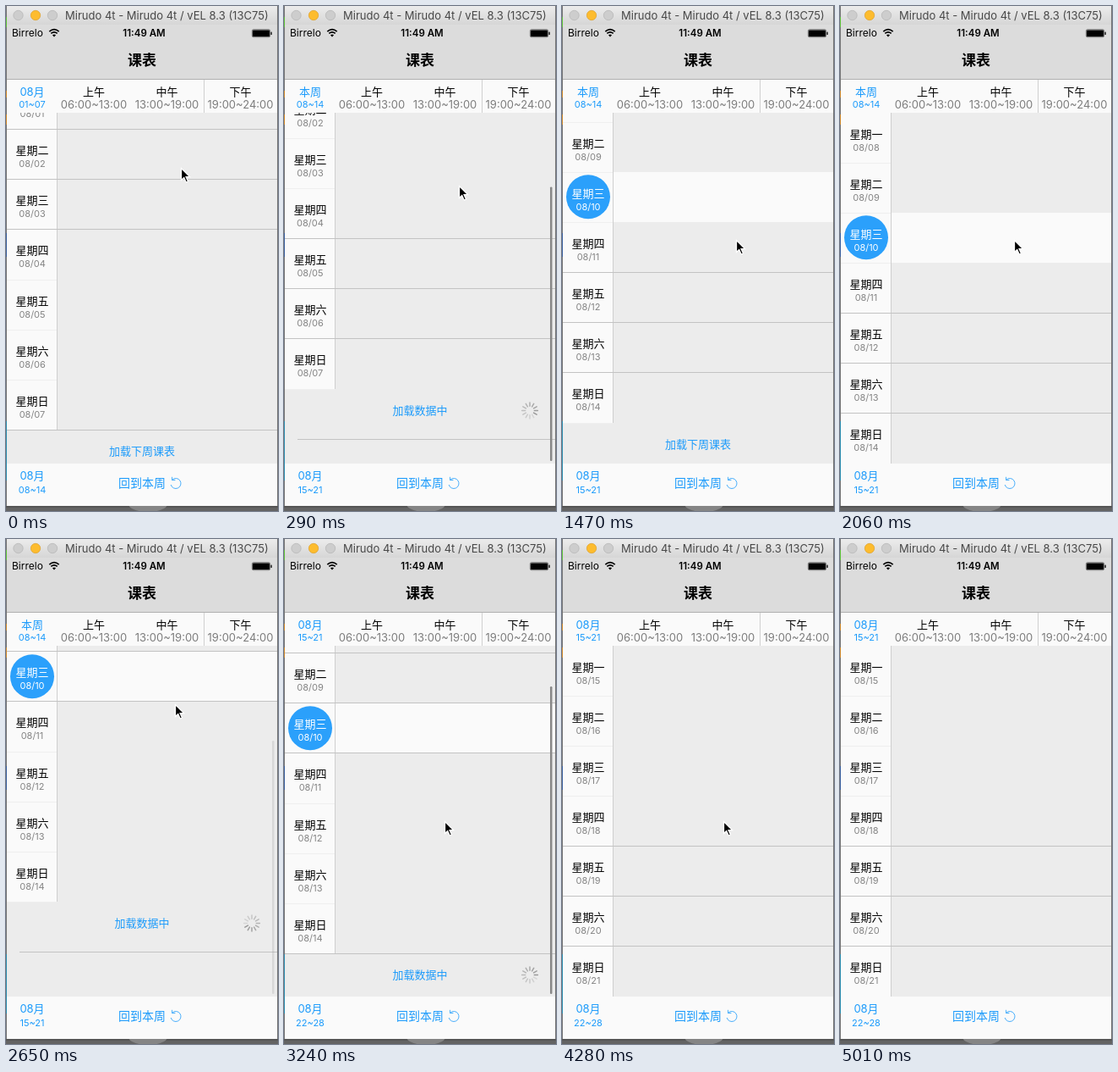
An HTML page that plays this animation: 322 px wide and 596 px high, repeating every 5.16 s.

```html
<!DOCTYPE html>
<html lang="zh-CN">
<head>
<meta charset="utf-8">
<style>
html, body { margin: 0; width: 100%; height: 100%; overflow: hidden; background: #666; }
svg { display: block; width: 322px; height: 596px; font-family: Inter, "Noto Sans CJK SC", "Noto Sans CJK", sans-serif; }
</style>
</head>
<body>
<svg id="stage" viewBox="0 0 322 596"></svg>
<script>
const LOOP = 5160, STEPS = 35, CYCLE = 17;
const TOP = 126, BOTTOM = 540, ROW = (BOTTOM - TOP) / 7, TODAY = 10;
const BLUE = '#1c9bfb', PAPER = '#fafafa', GREY = '#ececec', LINE = '#c3c3c3';
const DAYS = [...'一二三四五六日'];

// Per step of one pull-to-load cycle: scroll offset while pulled, scrollbar opacity.
const REST = 50.5, PULL = [39.5, 111.55, 88, 62, 52.5];
const BAR = [0, .2, 1, 1, 1, 1, 1, .6, .2];
// Times when new data arrives and the list starts to glide back to its top.
const RELOAD = [1418.9, 3919.2], GLIDE = 350;
// Pointer path: step, x, y.
const POINTER = [[0, 207, 191], [1, 207, 193], [2, 207, 212], [4, 206, 266], [5, 206, 276],
  [15, 206, 276], [16, 203, 254], [17, 201, 203], [18, 200, 195], [19, 199, 215], [21, 192, 322],
  [22, 190, 333], [29, 191, 333], [30, 205, 370], [31, 240, 450], [32, 275, 524], [33, 304, 576]];

const rect = (x, y, w, h, fill, more = '') =>
  `<rect x="${x}" y="${y}" width="${w}" height="${h}" fill="${fill}" ${more}/>`;
const circle = (x, y, r, fill, more = '') =>
  `<circle cx="${x}" cy="${y}" r="${r}" fill="${fill}" ${more}/>`;
const text = (s, x, y, size, fill = '#000', more = 'text-anchor="middle"') =>
  `<text x="${x}" y="${y + size * .37}" font-size="${size}" fill="${fill}" ${more}>${s}</text>`;
const pad = n => String(n).padStart(2, '0');
const ease = p => p < .5 ? 2 * p * p : 1 - 2 * (1 - p) ** 2;

function scrollOffset(step, pos, cycle) {
  if (pos < PULL.length) return PULL[pos];
  const p = (step * LOOP / STEPS - RELOAD[cycle]) / GLIDE;
  return REST * (1 - ease(Math.min(1, Math.max(0, p))));
}

function weekLabel(week, y, gap) {
  const first = week * 7 + 1;
  return text(week === 1 && y < TOP ? '本周' : '08月', 31, y, 13, BLUE) +
    text(`${pad(first)}~${pad(first + 6)}`, 31, y + gap, 11, BLUE);
}

function spinner(x, y, step) {
  const head = Math.round(step * LOOP / STEPS / 1000 * 12);
  let out = '';
  for (let k = 0; k < 12; k++) {
    const alpha = 1 - ((head - k + 120) % 12) / 15;
    out += `<path d="M0-5.3V-9.4" stroke="#999" stroke-width="1.5" stroke-linecap="round" opacity="${alpha}" transform="translate(${x} ${y}) rotate(${k * 30})"/>`;
  }
  return out;
}

function table(step, pos, cycle) {
  const offset = scrollOffset(step, pos, cycle);
  const week = cycle + (pos > 9), loading = pos > 0 && pos < 10;
  const rowTop = k => Math.floor(TOP + k * ROW - offset);
  const end = rowTop(7);
  let out = rect(1, TOP, 320, 414, GREY) + rect(1, TOP, 59, end - TOP, PAPER) +
    rect(60, TOP, 1, end - TOP, '#cfcfcf');
  DAYS.forEach((name, k) => {
    const y = rowTop(k), date = week * 7 + k + 1, today = date === TODAY;
    if (today) out += rect(61, y, 260, 59, PAPER) +
      circle(31, Math.round(TOP + k * ROW - offset) + 29.2, 26, '#2ba0fb');
    out += text('星期' + name, 31, y + 25, 13, today ? '#fff' : '#000') +
      text('08/' + pad(date), 31, y + 41, 11, today ? '#fff' : '#858585');
  });
  // Hairlines are half a point high, so only those on odd half points show fully.
  for (let k = 1; k < 8; k++) {
    const odd = Math.floor(2 * (k * ROW - offset) + 1e-6) & 1;
    out += odd ? rect(1, rowTop(k), 320, 1, LINE) : rect(1, rowTop(k), 59, 1, '#efefef');
  }
  out += text(loading ? '加载数据中' : '加载下周课表', 161, end + 25, 13, BLUE, 'text-anchor="middle" font-weight="500"') +
    rect(16, end + 59, 305, 1, LINE);
  if (loading) out += spinner(291, end + 25.5, step);
  const barTop = offset > REST ? 174 + (offset - REST) * 1.05 : 128 + offset * .91;
  return out + rect(315, barTop, 2.5, 537 - barTop, '#888', `rx="1.2" opacity="${BAR[pos] || 0}"`);
}

function pointer(step) {
  const n = POINTER.findIndex(p => p[0] >= step);
  if (n < 0) return '';
  const b = POINTER[n], a = POINTER[n - 1] || b;
  const f = a === b ? 0 : (step - a[0]) / (b[0] - a[0]);
  const x = a[1] + (b[1] - a[1]) * f, y = a[2] + (b[2] - a[2]) * f;
  return `<path d="M.5.5V14.5L3.7 11.5 6.2 17 8.5 16 6.1 10.6H10.5Z" stroke="#fff" stroke-width="1.3" transform="translate(${x} ${y})"/>`;
}

const desktop = rect(0, 0, 322, 596, '#777') +
  [[13, 12, '#5fc23a'], [100, 8, '#d08a2e'], [128, 12, '#d08a2e'], [268, 28, '#3d62a0'], [490, 70, '#2f8fb0']]
    .map(([y, h, c]) => rect(0, y, 1, h, c)).join('') +
  rect(0, 590, 322, 6, '#636363') + rect(0, 590, 322, 2, '#555') +
  '<ellipse cx="168" cy="588" rx="23" ry="9" fill="#858585"/>';

const chrome = '<linearGradient id="bar" x2="0" y2="1"><stop stop-color="#ececec"/><stop offset="1" stop-color="#d6d6d6"/></linearGradient>' +
  rect(1, 0, 320, 22, 'url(#bar)') +
  [[14.5, '#cdcdcd', '#b3b3b3'], [35, '#fdbc2e', '#dda02a'], [55, '#cdcdcd', '#b3b3b3']]
    .map(([x, c, s]) => circle(x, 11, 5.7, c, `stroke="${s}" stroke-width=".7"`)).join('') +
  text('Mirudo 4t - Mirudo 4t / vEL 8.3 (13C75)', 70, 11.5, 13, '#484848', '') +
  rect(1, 22, 320, 64, '#dcdcdc') + rect(1, 86, 320, 1, '#b0b0b0') +
  text('Birrelo', 7, 32, 12, '#000', '') +
  '<g fill="none" stroke="#000" stroke-width="1.7"><path d="M51.3 30.2Q57 25.2 62.7 30.2M53.3 32.4Q57 29.2 60.7 32.4"/></g><path d="M54.9 34.2Q57 32.6 59.1 34.2L57 36.4Z"/>' +
  text('11:49 AM', 163.5, 32, 11.5, '#000', 'text-anchor="middle" font-weight="600"') +
  rect(291.3, 27.8, 21.4, 8.9, 'none', 'rx="1.8" stroke="#000" stroke-width=".5"') +
  rect(292, 28.5, 20, 7.5, '#000', 'rx="1"') + rect(313.4, 30.5, 1.3, 3.5, '#000', 'rx=".6"') +
  text('课表', 161, 64, 17, '#000', 'text-anchor="middle" font-weight="600"') +
  rect(1, 87, 320, 39, PAPER) + rect(234, 87, 1, 39, '#d0d0d0') +
  [['上午', '06:00~13:00', 104], ['中午', '13:00~19:00', 190.5], ['下午', '19:00~24:00', 277.5]]
    .map(([name, hours, x]) => text(name, x, 101, 13) + text(hours, x, 116, 13, '#7d7d7d')).join('');

const footer = rect(1, BOTTOM, 320, 50, PAPER) + text('回到本周', 161, 563, 14, BLUE) +
  `<path d="M196.8 559.2A6 6 0 1 1 195.2 565M196.6 555.8V559.6H200.4" fill="none" stroke="${BLUE}" stroke-width=".8"/>`;

const stage = document.getElementById('stage');
let shown = -1;

function draw(step) {
  const cycle = step < CYCLE ? 0 : 1, pos = step - cycle * CYCLE;
  const heading = cycle + (pos > 1);
  stage.innerHTML = desktop + table(step, pos, cycle) + chrome + footer +
    weekLabel(heading, 101, 15) + weekLabel(heading + 1, 554, 17) + pointer(step);
}

function tick(now) {
  const step = Math.floor((now % LOOP + 9) * STEPS / LOOP) % STEPS;
  if (step !== shown) draw(shown = step);
  requestAnimationFrame(tick);
}
tick(0);
</script>
</body>
</html>
```
